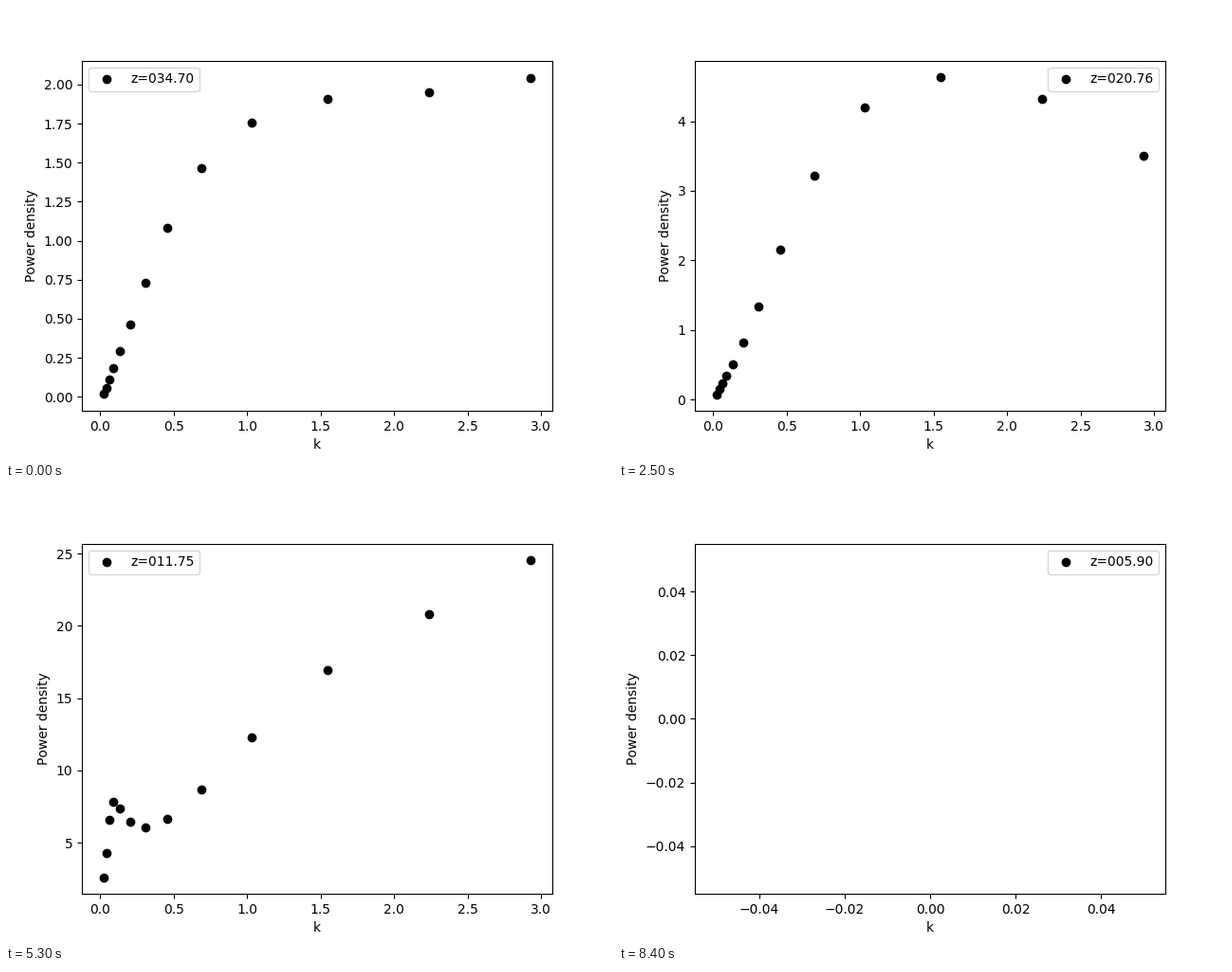
Recreate the animation shown at these times as a matplotlib script. Size 640x480 px, loop 8.5 s.

```python
import numpy as np
import matplotlib.pyplot as plt
from matplotlib.animation import FuncAnimation

FRAMES = 85
INTERVAL = 100
EMPTY = (41, 84)        # steps without valid data
AXES_PX = (496, 369.6)
PAD_PX = 3

plt.rcParams["font.family"] = "DejaVu Sans"
plt.rcParams["text.kerning_factor"] = 6

# Wavenumber bins grow by a factor of 1.5; both ends are cut short.
K = 0.0907 * 1.5 ** np.arange(-3, 10)
K[[0, 1, -2, -1]] = 0.0267, 0.0438, 2.239, 2.925
BINS = np.arange(len(K))

# Power at a few bins and steps; a smooth log curve joins the bins
# and a steady log drift joins the steps.
KNOTS = [0, 2, 4, 6, 9, 11, 12]
SPECTRA = {
    0: [.019, .11, .291, .731, 1.758, 1.953, 2.044],
    16: [.0045, .02, .06, .19, .649, .547, .436],
    34: [22, 37, 46.5, 86, 229, 338, 282],
    46: [34.2, 71.9, 48.3, 18.9, 20, 28.2, 26.8],
    51: [4.5, 10, 8, 4.8, 10, 17, 19.5],
    62: [.2, 1, 5.1, 17, 31.4, 51.3, 69.7],
    71: [1.4, 9.1, 18.8, 20.2, 16.5, 26.1, 38.1],
    83: [.08, .5, 1, .8, .45, .55, .75],
}
SPECTRA[20] = [0.7 * p for p in SPECTRA[16]]

STEPS = sorted(SPECTRA)
LOGS = np.log([SPECTRA[s] for s in STEPS])
CURVES = np.polyfit(KNOTS, LOGS.T, len(KNOTS) - 1)


def power(n):
    curve = [np.interp(n, STEPS, c) for c in CURVES]
    return np.exp(np.polyval(curve, BINS))


def redshift(n):
    step = n - (n >= EMPTY[0])
    return 35.704 / 1.02 ** step - 1


def limits(values, size_px):
    """Data range widened by a small pad and a 5 % margin."""
    pad = PAD_PX / size_px
    lo, hi = values.min() - pad, values.max() + pad
    margin = 0.05 * (hi - lo)
    return lo - margin, hi + margin


fig, ax = plt.subplots(figsize=(6.4, 4.8), dpi=100)


def draw(n):
    ax.clear()
    if n in EMPTY:
        x = y = np.array([])
        xlim = ylim = (-0.055, 0.055)
    else:
        x, y = K, power(n)
        xlim, ylim = limits(x, AXES_PX[0]), limits(y, AXES_PX[1])
    ax.scatter(x, y, color="black", label=f"z={redshift(n):06.2f}")
    ax.set(xlim=xlim, ylim=ylim, xlabel="k", ylabel="Power density")
    ax.legend(loc="best")
    return []


anim = FuncAnimation(fig, draw, frames=FRAMES, init_func=lambda: draw(0),
                     interval=INTERVAL, repeat=True, repeat_delay=0)
plt.show()
```
